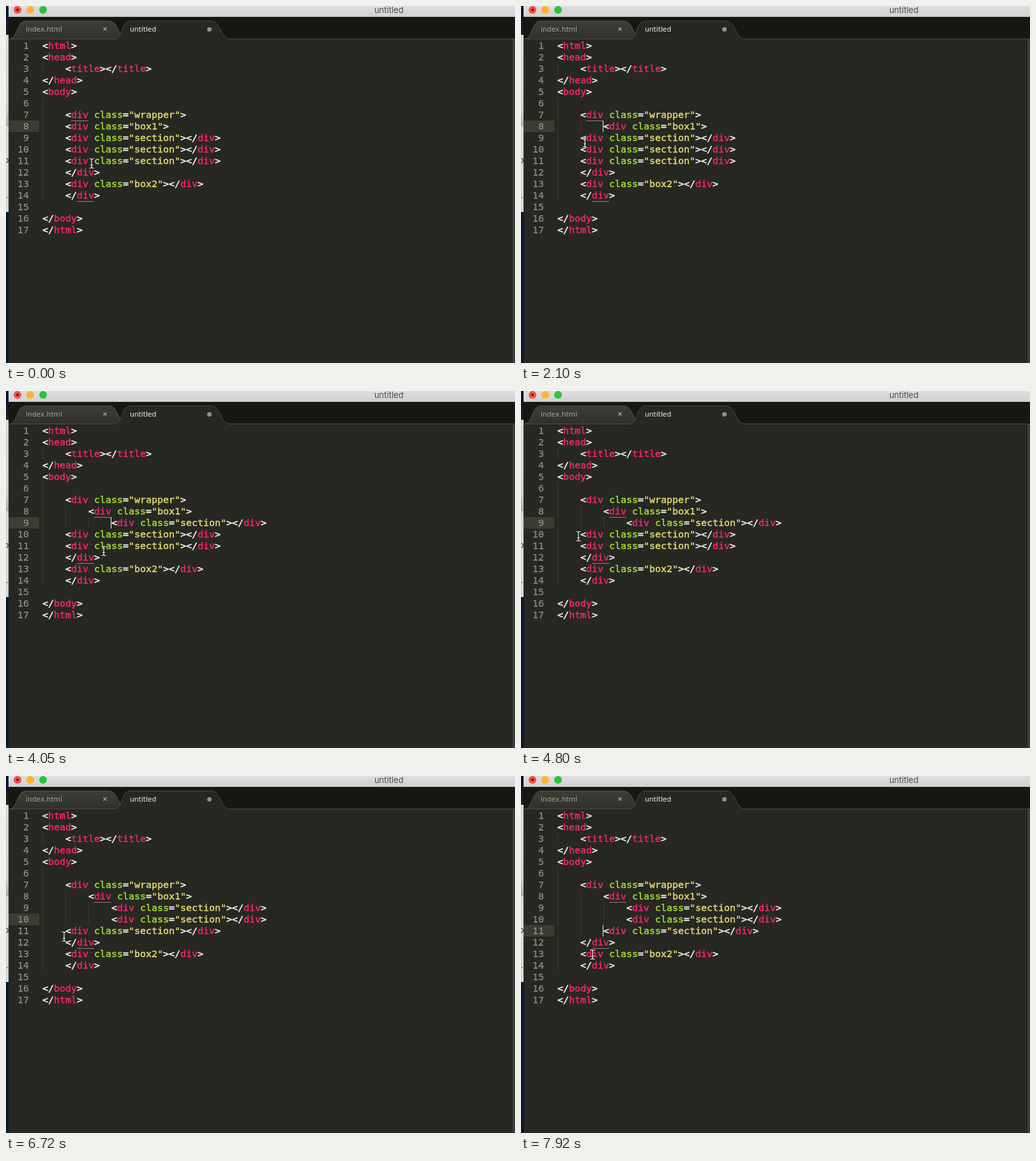
An HTML page for the animation above (8 s loop, 797 px wide and 558 px high).

```html
<!DOCTYPE html>
<html lang="en">
<head>
<meta charset="utf-8">
<title>Indenting markup</title>
<style>
  html, body { margin: 0; width: 100%; height: 100%; overflow: hidden; background: #272822; }
  svg { display: block; width: 797px; height: 558px; }
  text { white-space: pre; }
  .code { font: 14.95px "DejaVu Sans Mono", monospace; fill: #f8f8f2; stroke: #f8f8f2; stroke-width: .45px; }
  .num { fill: #8f908a; stroke: #8f908a; stroke-width: .25px; text-anchor: end; }
  .tag { fill: #f92672; stroke: #f92672; }
  .attr { fill: #a6e22e; stroke: #a6e22e; }
  .str { fill: #e6db74; stroke: #e6db74; }
  .tab { font: 10.7px "DejaVu Sans", sans-serif; }
  .title { font: 13px Inter, sans-serif; fill: #4b4b4b; text-anchor: middle; }
  .page { font: 13px "Liberation Sans", sans-serif; fill: #222; }
  .guide { stroke: #4a4a44; stroke-dasharray: 1 1; }
</style>
</head>
<body>
<svg viewBox="0 0 797 558">
  <defs>
    <linearGradient id="bar" x2="0" y2="1">
      <stop stop-color="#dedede"/><stop offset="1" stop-color="#d0d0d0"/>
    </linearGradient>
    <linearGradient id="idle" x2="0" y2="1">
      <stop stop-color="#3d3e38"/><stop offset="1" stop-color="#30312b"/>
    </linearGradient>
    <linearGradient id="shade" x2="0" y2="1">
      <stop stop-color="#d6d8d8"/><stop offset=".8" stop-color="#cccece"/><stop offset="1" stop-color="#a9abab"/>
    </linearGradient>
    <clipPath id="strip"><path d="M0 0H4V558H0z"/></clipPath>
  </defs>

  <rect width="797" height="558" fill="#272822"/>

  <!-- window behind -->
  <g clip-path="url(#strip)">
    <rect width="4" height="558" fill="#071730"/>
    <rect y="24" width="4" height="21" fill="#1d1e1b"/>
    <rect y="45" width="4" height="143" fill="url(#shade)"/>
    <rect y="188" width="4" height="134" fill="#d4d6d6"/>
    <text class="page" x="-3" y="245">p</text>
    <text class="page" x="0" y="300">.</text>
  </g>

  <!-- title bar -->
  <rect x="4" width="793" height="17" fill="url(#bar)"/>
  <circle cx="18" cy="6" r="6" fill="#fc4a48"/>
  <circle cx="18" cy="6" r="2" fill="#6d0a08"/>
  <circle cx="38" cy="6" r="6" fill="#fdb32c"/>
  <circle cx="58" cy="6" r="6" fill="#2bc33a"/>
  <text class="title" x="599.5" y="11">untitled</text>

  <!-- tabs -->
  <rect x="4" y="17" width="793" height="34" fill="#171813"/>
  <path d="M5 51.5C19 51 16 23.5 31 23.5H161C177 23.5 174 51 190 51.5" fill="url(#idle)" stroke="#55564f"/>
  <path d="M170 52C184 51 179 23.5 195 23.5H321C337 23.5 335 51 350 52z" fill="#272822"/>
  <path d="M4 51.5H170C184 51 179 23.5 195 23.5H321C337 23.5 335 51 350 51.5H797" fill="none" stroke="#4b4c45"/>
  <text class="tab" x="31" y="40" fill="#a5a6a0">index.html</text>
  <path d="M152.5 33.5l5 5m0-5l-5 5" stroke="#a5a6a0" stroke-width="1.3"/>
  <text class="tab" x="194" y="40" fill="#f4f4ef">untitled</text>
  <circle cx="318.5" cy="36.5" r="3.5" fill="#90918b"/>
  <rect x="793" y="52" width="4" height="506" fill="#3b3c37"/>

  <rect id="row" x="4" width="48" height="18" fill="#3d3c33"/>
  <g id="guides"></g>
  <g id="code"></g>
  <g id="marks" fill="#85867f"></g>
  <rect id="caret" width="1" height="18" fill="#f8f8f0"/>
  <g id="mouse" fill="none" stroke-linecap="round"></g>
</svg>

<script>
const LINES = [
  [0, '<html>'], [0, '<head>'], [1, '<title></title>'], [0, '</head>'], [0, '<body>'], [1, ''],
  [1, '<div class="wrapper">'], [1, '<div class="box1">'],
  [1, '<div class="section"></div>'], [1, '<div class="section"></div>'], [1, '<div class="section"></div>'],
  [1, '</div>'], [1, '<div class="box2"></div>'], [1, '</div>'],
  [0, ''], [0, '</body>'], [0, '</html>']
];

// step, line, caret level: a click or a press of Tab
const EDITS = [
  [-4, 8, 1], [4, 8, 2], [17, 9, 1], [24, 9, 2], [26, 9, 3],
  [34, 10, 1], [36, 10, 2], [39, 10, 3], [47, 11, 1], [52, 11, 2]
];

// step, x, y of the pointer
const PATH = [
  [0, 134, 246], [3, 134, 246], [7, 129, 238], [14, 100, 213], [16, 95, 208], [17, 95, 209],
  [21, 159, 250], [23, 166, 255], [26, 166, 255], [32, 90, 227], [34, 92, 226],
  [36, 110, 253], [38, 110, 253], [40, 110, 255], [45, 91, 251], [47, 92, 244],
  [51, 112, 279], [53, 112, 279]
];

const BEAM = 'M-3 -7.5Q0 -7.5 0 -5Q0 -7.5 3 -7.5M0 -5V5M-3 7.5Q0 7.5 0 5Q0 7.5 3 7.5M-1.5 2.5H1.5';
const LOOP = 8000, BLINK = 3.5;

// steps last 150 ms, a few of them 140
const SHORT = [32, 35, 43];
const starts = [0];
for (let i = 0; i < 53; i++) starts.push(starts[i] + (SHORT.includes(i) ? 140 : 150));

const $ = id => document.getElementById(id);
const rowTop = line => 53 + 18 * (line - 1);
const left = level => 57 + 36 * level;

function set(el, attrs) {
  for (const k in attrs) el.setAttribute(k, attrs[k]);
  return el;
}

function add(parent, name, attrs, text = '') {
  const el = set(document.createElementNS('http://www.w3.org/2000/svg', name), attrs);
  el.textContent = text;
  return parent.appendChild(el);
}

function kind(token) {
  if (token[0] === '"') return 'str';
  if (token === ' class') return 'attr';
  return /\w/.test(token) ? 'tag' : '';
}

const texts = LINES.map(([level, src], i) => {
  const y = rowTop(i + 1) + 14;
  add($('code'), 'text', { class: 'code num', x: 36, y }, i + 1);
  const el = add($('code'), 'text', { class: 'code', x: left(level), y });
  for (const token of src.match(/"[^"]*"| ?\w+|[^\w" ]+/g) || []) {
    add(el, 'tspan', { class: kind(token) }, token);
  }
  return el;
});

const guides = LINES.map((_, i) => [0, 1, 2].map(k => add($('guides'), 'path', {
  class: 'guide', d: `M${left(k) + .5} ${rowTop(i + 1)}v18`
})));

const marks = [0, 1].map(() => add($('marks'), 'rect', { width: 27, height: 1 }));

add($('mouse'), 'path', { d: BEAM, stroke: '#1c1d19', 'stroke-width': 2.4, opacity: .6 });
add($('mouse'), 'path', { d: BEAM, stroke: '#f4f4f0', 'stroke-width': 1.2 });

function pointer(step) {
  const j = Math.max(1, PATH.findIndex(p => p[0] >= step));
  const [a, x0, y0] = PATH[j - 1], [b, x1, y1] = PATH[j];
  const k = (step - a) / (b - a);
  return [x0 + (x1 - x0) * k, y0 + (y1 - y0) * k].map(Math.round);
}

function draw(step) {
  const levels = LINES.map(l => l[0]);
  let last;
  for (const edit of EDITS) {
    if (edit[0] > step) break;
    last = edit;
    levels[edit[1] - 1] = edit[2];
  }
  const [since, line, level] = last;

  levels.forEach((n, i) => {
    set(texts[i], { x: left(n) });
    guides[i].forEach((g, k) => set(g, { visibility: k < n ? 'visible' : 'hidden' }));
  });

  set($('row'), { y: rowTop(line) });
  set($('caret'), {
    x: left(level) - 1,
    y: rowTop(line),
    opacity: Math.floor((step - since) / BLINK) % 2 ? 0 : 1
  });

  // the tag pair around the caret
  const pair = line > 8 ? [8, 12] : [7, 14];
  pair.forEach((n, i) => set(marks[i], { x: left(levels[n - 1]) + 9 * (i + 1), y: rowTop(n + 1) }));

  set($('mouse'), { transform: `translate(${pointer(step)})` });
}

const begin = performance.now();
function tick() {
  const t = (performance.now() - begin) % LOOP;
  draw(starts.filter(s => s <= t).length - 1);
  requestAnimationFrame(tick);
}
tick();
</script>
</body>
</html>
```
